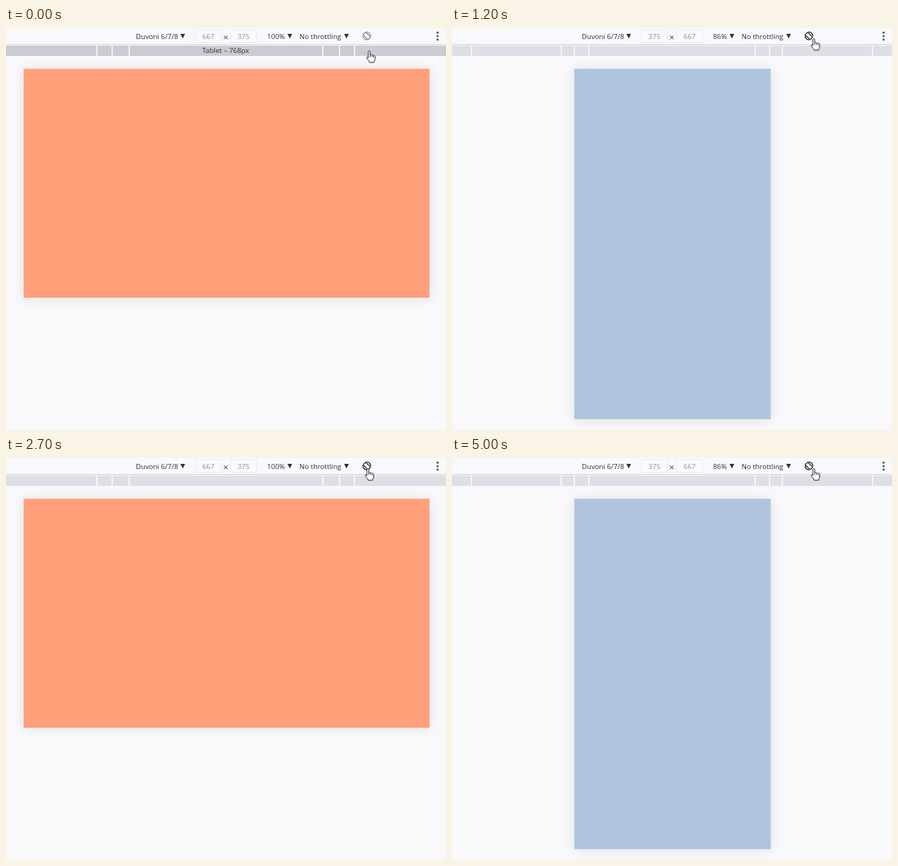
These frames come from a looping animation (600x547 px, 6100 ms). An HTML page:

```html
<!DOCTYPE html>
<html lang="en">
<head>
<meta charset="utf-8">
<title>Device rotation</title>
<style>
  html, body { margin: 0; width: 100%; height: 100%; overflow: hidden; background: #f9f8fb; }
  svg { display: block; width: 100vw; height: 100vh; }
  text { font: 9.6px "Open Sans", "Noto Sans", sans-serif; fill: #303236; }
  .field { fill: #faf9fb; stroke: #ebeaed; }
  .size { fill: #8d8e92; text-anchor: middle; }
  .arrow { fill: #303236; }
  #page { filter: drop-shadow(0 1px 8px rgba(0, 0, 0, .1)); }
</style>
</head>
<body>
<svg viewBox="0 0 600 547">
  <defs><path id="arrow" class="arrow" d="M-3.2 8H3.2L0 14.2Z"/></defs>
  <rect width="600" height="547" fill="#f9f8fb"/>
  <rect id="page"/>

  <rect width="600" height="22" fill="#f9f8fb"/>
  <rect y="22" width="600" height="1" fill="#d3d4d8"/>
  <rect y="23" width="600" height="1" fill="#f9f8fb"/>
  <rect id="bar" y="24" width="600" height="14"/>
  <path id="ticks" stroke="#fbfbfd" stroke-width="1.5"/>
  <text id="label" x="299.5" y="34.3" text-anchor="middle">Tablet – 768px</text>

  <text x="177" y="14.5">Duvoni 6/7/8</text>
  <use href="#arrow" x="241"/>
  <rect class="field" x="258.5" y="2.5" width="35" height="17"/>
  <rect class="field" x="306.5" y="2.5" width="35" height="17"/>
  <text id="width" class="size" x="276" y="14.5"></text>
  <text id="height" class="size" x="324" y="14.5"></text>
  <path d="M297.2 10.3l5 5m0-5l-5 5" stroke="#303236" fill="none"/>
  <text id="zoom" x="356" y="14.5"></text>
  <g id="controls">
    <use href="#arrow" x="387"/>
    <text x="400" y="14.5">No throttling</text>
    <use href="#arrow" x="464.3"/>
    <g id="rotate" transform="translate(492 10.8)" fill="none">
      <rect x="-4.8" y="-2.5" width="9.6" height="5" rx=".8" transform="rotate(45)"/>
      <path d="M-.5-5.3A5.4 5.4 0 0 1 5.3 .5M.5 5.3A5.4 5.4 0 0 1-5.3-.5"/>
    </g>
  </g>
  <g fill="#55575b">
    <circle cx="588.5" cy="6.2" r="1.5"/>
    <circle cx="588.5" cy="11" r="1.5"/>
    <circle cx="588.5" cy="15.8" r="1.5"/>
  </g>

  <g id="cursor" fill="#fff" stroke="#292929" stroke-linejoin="round">
    <path d="M-1.5 9.2V1.2a1.3 1.3 0 0 1 2.6 0V5.6c.6-.6 2.2-.5 2.5.4c.7-.5 2.1-.3 2.3.6c.9-.4 2 .1 2 1.2v2.6c0 1.6-1.3 2.6-1.5 5.2H.2c-.3-2-2.2-3.3-3.6-5.6c-.8-1.4.7-2.3 1.9-1.2z"/>
    <path d="M1.1 5.6v3M3.6 6v2.8M5.9 6.6v2.4" stroke-width=".8"/>
  </g>
</svg>
<script>
const LOOP = 6100;
const $ = id => document.getElementById(id);
const set = (el, attrs) => {
  for (const name in attrs) el.setAttribute(name, attrs[name]);
};

const landscape = {
  page: { x: 24, y: 55.5, width: 553.5, height: 311.5, fill: '#ffa07a' },
  ticks: [124, 144.7, 168, 432, 454.7, 475.3],
  size: [667, 375], zoom: '100%', shift: 0
};
const portrait = {
  page: { x: 166.7, y: 55.5, width: 268, height: 476.7, fill: '#b0c4de' },
  ticks: [26.5, 149, 166.7, 186.5, 413.5, 433, 450.5, 573.5],
  size: [375, 667], zoom: '86%', shift: -5.3
};

// Pointer stops: start time, x, y
const stops = [
  [0, 495.5, 31.3], [300, 494.2, 30], [500, 493.8, 25],
  [600, 493.6, 19], [700, 493.4, 16], [900, 493.6, 14.6]
];

const within = (t, start, end) => t >= start && t < end;

function render(t) {
  const upright = within(t, 1200, 2700) || t >= 4600;
  const view = upright ? portrait : landscape;
  const pressed = within(t, 2600, 2700) || within(t, 4500, 4600);
  const [, x, y] = stops.filter(stop => t >= stop[0]).pop();
  const onBar = y > 24;
  const onButton = y < 22;

  set($('page'), view.page);
  set($('ticks'), { d: view.ticks.map(tick => `M${tick} 24V38`).join('') });
  set($('bar'), { fill: onBar ? '#c9cdd3' : '#dce0e6' });
  set($('label'), { visibility: onBar ? 'visible' : 'hidden' });
  $('width').textContent = view.size[0];
  $('height').textContent = view.size[1];
  $('zoom').textContent = view.zoom;
  set($('controls'), { transform: `translate(${view.shift} 0)` });
  set($('rotate'), {
    stroke: onButton && !pressed ? '#242529' : '#66686c',
    'stroke-width': onButton && !pressed ? 1.25 : 1
  });
  set($('cursor'), { transform: `translate(${x} ${y})` });
}

const start = performance.now();
function tick() {
  render((performance.now() - start) % LOOP);
  requestAnimationFrame(tick);
}
tick();
</script>
</body>
</html>
```
